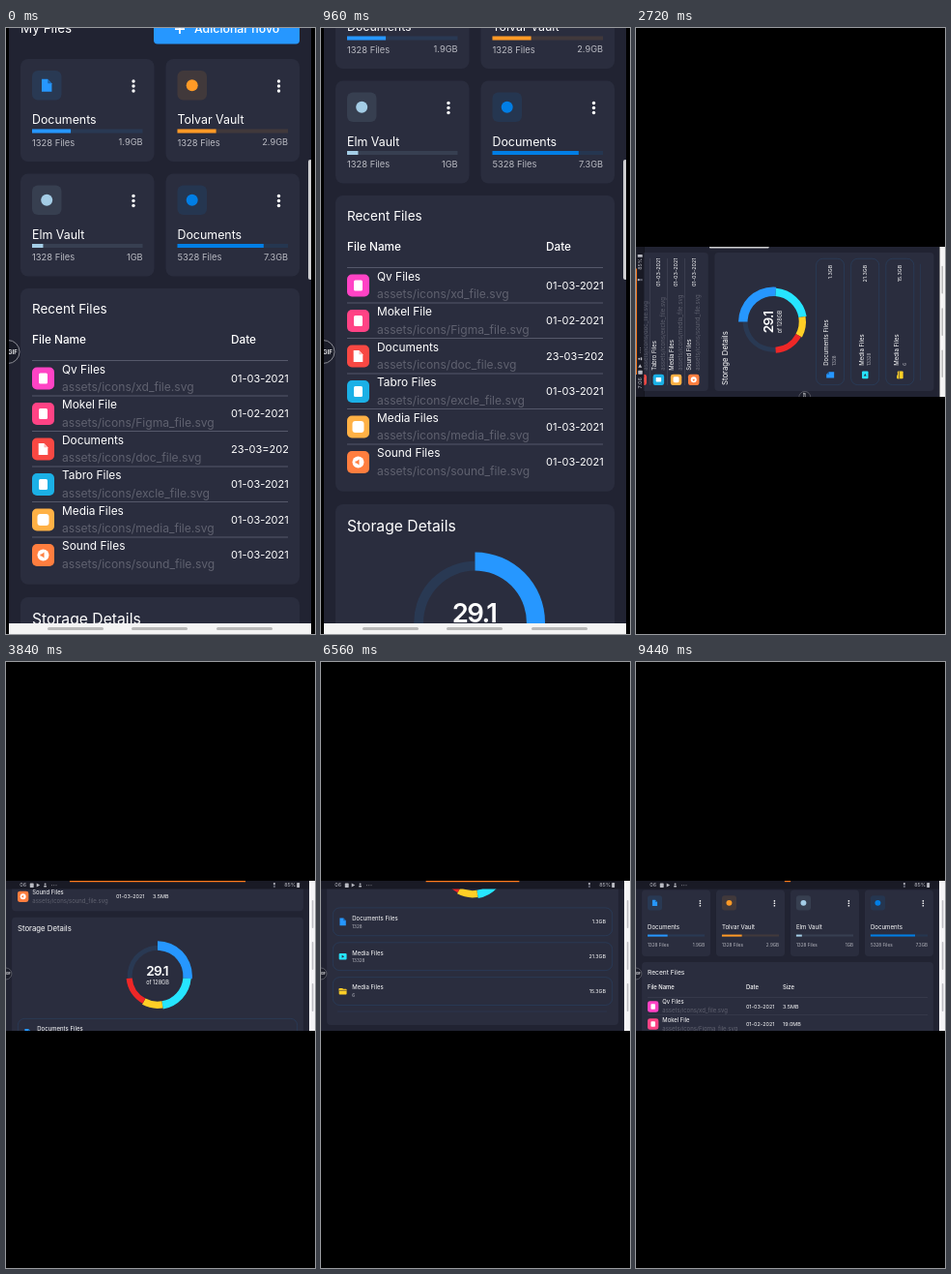
Animation, 320 px wide and 626 px high, one loop 9600 ms. Source, as an HTML page with a canvas:

```html
<!DOCTYPE html>
<html lang="en">
<head>
<meta charset="utf-8">
<title>File dashboard</title>
<style>
  html, body { margin: 0; width: 100%; height: 100%; overflow: hidden; background: #000; }
  canvas { display: block; width: 320px; height: 626px; }
</style>
</head>
<body>
<canvas></canvas>
<script>
const W = 320, H = 626, LOOP = 9600, STEP = 160;
const HALF = 0.495; // size of the turned screen relative to the upright one
const BG = '#212332', CARD = '#2a2d3e', BLUE = '#2697ff', CYAN = '#26e5ff',
      YELLOW = '#ffcf26', RED = '#ee2727', WHITE = '#fff', DIM = '#b9bac2', FAINT = '#5f616f';

const canvas = document.querySelector('canvas');
const ctx = canvas.getContext('2d');
const ratio = window.devicePixelRatio || 1;
canvas.width = W * ratio;
canvas.height = H * ratio;
const snap = canvas.cloneNode();

const drives = [
  ['Documents', 1328, '1.9GB', BLUE, 0.35],
  ['Tolvar Vault', 1328, '2.9GB', '#ff9a26', 0.35],
  ['Elm Vault', 1328, '1GB', '#a4cde6', 0.1],
  ['Documents', 5328, '7.3GB', '#007ee5', 0.78],
];
const files = [
  ['Qv Files', 'xd_file', '01-03-2021', '3.5MB', '#ff43c5'],
  ['Mokel File', 'Figma_file', '01-02-2021', '19.0MB', '#ff4385'],
  ['Documents', 'doc_file', '23-03=2021', '32.5MB', '#f84843'],
  ['Tabro Files', 'excle_file', '01-03-2021', '34.5MB', '#1bb0e6'],
  ['Media Files', 'media_file', '01-03-2021', '2.5GB', '#ffb145'],
  ['Sound Files', 'sound_file', '01-03-2021', '3.5MB', '#ff7e3f'],
];
const groups = [
  ['Documents Files', 1328, '1.3GB', BLUE],
  ['Media Files', 13328, '21.3GB', CYAN],
  ['Media Files', 6, '15.3GB', YELLOW],
];

const uprightScroll = [[0, 0], [960, 96], [1280, 300], [1440, 425], [1600, 441]];
const wideScroll = [[3680, 204], [4300, 204], [5120, 294.5], [5760, 318.5], [8000, 318.5], [9440, 0]];
const glowLevel = [[1280, 0], [1600, 1], [2080, 0]];

function at(keys, t) {
  if (t <= keys[0][0]) return keys[0][1];
  for (let i = 1; i < keys.length; i++) {
    const [t0, a] = keys[i - 1], [t1, b] = keys[i];
    if (t < t1) return a + (b - a) * (t - t0) / (t1 - t0);
  }
  return keys[keys.length - 1][1];
}

function box(x, y, w, h, r, color) {
  ctx.fillStyle = color;
  ctx.beginPath();
  ctx.roundRect(x, y, w, h, r);
  ctx.fill();
}

function dot(x, y, r, color) {
  ctx.fillStyle = color;
  ctx.beginPath();
  ctx.arc(x, y, r, 0, 7);
  ctx.fill();
}

function shape(color, ...points) {
  ctx.fillStyle = color;
  ctx.beginPath();
  points.forEach(p => ctx.lineTo(...p));
  ctx.fill();
}

function text(s, x, y, size, color = WHITE, align = 'left', weight = 400) {
  ctx.font = `${weight} ${size}px Inter, sans-serif`;
  ctx.fillStyle = color;
  ctx.textAlign = align;
  ctx.textBaseline = 'middle';
  ctx.fillText(s, x, y + 0.4);
}

function clipped(x, y, w, h, draw) {
  ctx.save();
  ctx.beginPath();
  ctx.rect(x, y, w, h);
  ctx.clip();
  draw();
  ctx.restore();
}

// Sheet of paper with a folded corner, k = half height
function sheet(x, y, k, color, fold) {
  const w = k * 0.8;
  shape(color, [x - w, y - k], [x + w * 0.2, y - k], [x + w, y - k * 0.3], [x + w, y + k], [x - w, y + k]);
  shape(fold, [x + w * 0.2, y - k], [x + w, y - k * 0.3], [x + w * 0.2, y - k * 0.3]);
}

function driveCard([name, count, size, color, part], i, x, y, w, h) {
  const extra = h - 106, right = x + w - 12;
  box(x, y, w, h, 8, CARD);
  box(x + 12, y + 12, 30.5, 30.5, 6, color + '1c');
  if (i) dot(x + 27.2, y + 27.2, 6, color);
  else sheet(x + 27.2, y + 27.2, 6.5, color, '#1c66ad');
  for (const dy of [-5, 0, 5]) dot(x + w - 21.5, y + 28 + dy, 1.7, WHITE);
  text(name, x + 12, y + 63 + extra * 0.43, 12.4);
  const barY = y + 72.5 + extra * 0.64, barW = w - 24;
  box(x + 12, barY, barW, 4, 0, color + '1c');
  box(x + 12, barY, barW * part, 4, 0, color);
  const countY = y + 86.3 + extra * 0.86;
  text(count + ' Files', x + 12, countY, 9.4, DIM);
  text(size, right, countY, 9.2, DIM, 'right');
}

function fileIcon(i, x, y, color) {
  box(x - 11.5, y - 11.5, 23, 23, 5, color);
  if (i === 2) sheet(x, y, 6, WHITE, '#ffb6b4');
  else if (i === 4) box(x - 6, y - 6, 12, 12, 3, WHITE);
  else if (i === 5) {
    dot(x, y, 6, WHITE);
    shape(color, [x - 3, y - 1], [x - 1.5, y - 1], [x + 1, y - 3], [x + 1, y + 3], [x - 1.5, y + 1], [x - 3, y + 1]);
  } else box(x - 4.5, y - 5.5, 9, 11, 1.5, WHITE);
}

function recentCard(y, w) {
  box(15, y, w, 305.8, 8, CARD);
  text('Recent Files', 27, y + 21.5, 13.5);
  clipped(27, y, w - 24, 305, () => {
    ['File Name', 'Date', 'Size'].forEach((s, i) =>
      text(s, [27, 233, 310][i], y + 53, 11.8, WHITE, 'left', 500));
    files.forEach(([name, path, date, size, color], i) => {
      const top = y + 74.5 + i * 36.5;
      box(27, top - 0.4, w - 24, 0.8, 0, '#55586a');
      fileIcon(i, 38.5, top + 18.5, color);
      text(name, 58, top + 9.5, 11.9);
      text(`assets/icons/${path}.svg`, 58, top + 27.5, 12.1, FAINT);
      text(date, 233, top + 18.5, 11);
      text(size, 310, top + 18.5, 11);
    });
  });
}

function donut(x, y) {
  const parts = [[25, 72.5, BLUE], [20, 70.2, CYAN], [10, 67.9, YELLOW], [15, 65.6, RED], [25, 63.3, BLUE + '1c']];
  let from = -Math.PI / 2;
  for (const [value, outer, color] of parts) {
    const to = from + value / 95 * Math.PI * 2;
    ctx.fillStyle = color;
    ctx.beginPath();
    ctx.arc(x, y, outer, from, to);
    ctx.arc(x, y, 53.4, to, from, true);
    ctx.fill();
    from = to;
  }
  ctx.letterSpacing = '-1.6px';
  text('29.1', x - 1, y - 8.8, 27.5, WHITE, 'center', 600);
  ctx.letterSpacing = '0px';
  text('of 128GB', x, y + 14, 11.2, WHITE, 'center');
}

function groupIcon(i, x, y, color) {
  if (i === 0) sheet(x, y, 8, color, '#1c66ad');
  else if (i === 1) {
    box(x - 8, y - 6.5, 16, 13, 2, color);
    shape(CARD, [x - 2, y - 3], [x + 3, y], [x - 2, y + 3]);
  } else {
    box(x - 8, y - 6.5, 8, 5, 1, color);
    box(x - 8, y - 5, 16, 11.5, 1.5, color);
    box(x - 8, y - 2.6, 16, 1.2, 0, CARD);
  }
}

function storageCard(y, w) {
  box(15, y, w, 456, 8, CARD);
  text('Storage Details', 27, y + 23, 15.7);
  donut(15 + w / 2, y + 122);
  groups.forEach(([name, count, size, color], i) => {
    const top = y + 211.2 + i * 72.5, mid = top + 29.3;
    ctx.strokeStyle = BLUE + '26';
    ctx.lineWidth = 1.6;
    ctx.beginPath();
    ctx.roundRect(27.8, top, w - 25.6, 58.2, 14);
    ctx.stroke();
    groupIcon(i, 48.5, mid, color);
    text(name, 68, mid - 7.5, 12.2);
    text(count, 68, mid + 9.2, 9.2, DIM);
    text(size, w - 11, mid, 10.8, WHITE, 'right');
  });
  box(37, y + 427, w - 46, 1.2, 0, BLUE + '26');
}

function page(wide) {
  const w = wide ? 610 : 289, columns = wide ? 4 : 2, h = wide ? 138.6 : 106;
  const cardW = (w - 12 * (columns - 1)) / columns;
  text('My Files', 15, 1, 13.5);
  box(w - 136, -20, 151, 36.5, 4, BLUE);
  box(w - 114, 0.2, 10, 1.8, 0, WHITE);
  box(w - 109.9, -4, 1.8, 10, 0, WHITE);
  text('Adicionar novo', w - 94, 1, 12.3, WHITE, 'left', 500);
  drives.forEach((drive, i) => driveCard(drive, i,
    15 + (i % columns) * (cardW + 12), 32 + Math.floor(i / columns) * 118.5, cardW, h));
  const top = wide ? 32 + h + 12 : 269;
  recentCard(top, w);
  storageCard(top + 319, w);
}

function bubble() {
  dot(2, 334.5, 12, '#1b1d29');
  ctx.strokeStyle = '#8c8d95';
  ctx.lineWidth = 1;
  ctx.stroke();
  text('GIF', 2, 334.5, 6, WHITE, 'left', 600);
}

// Status bar drawn from (0, 0), with the orange line that shrinks to its middle
function status(w, clock, clockX, t) {
  box(0, 0, w, 17, 0, '#191a25');
  text(clock, clockX, 9, 11, DIM);
  box(50, 5, 8, 9, 1, DIM);
  shape(DIM, [64, 5], [71, 9], [64, 13]);
  dot(82, 7, 2, DIM);
  box(79, 10, 6, 3, 1, DIM);
  for (let i = 0; i < 3; i++) dot(96 + i * 4.5, 9.5, 1, DIM);
  text('85%', w - 28, 9, 11, DIM, 'right');
  box(w - 26, 4, 6, 10, 1, DIM);
  dot(w - 73, 6, 2.2, DIM);
  box(w - 75, 9, 4, 5, 0, FAINT);
  const part = 0.02 + (9440 - t) * 1e-4;
  box(w / 2 * (1 - part), 0, w * part, 2.4, 0, '#ff7a1c');
}

function upright(scroll, glow = 0) {
  clipped(3, 0, 313, 615, () => {
    box(0, 0, W, 615, 0, BG);
    ctx.save();
    ctx.translate(0, -scroll);
    page(false);
    ctx.restore();
    if (glow) dot(159.5, 615 - 33 * glow + 811, 811, `rgba(56,122,118,${0.38 * glow})`);
    bubble();
    box(313, 136, 4, 124, 2, '#cfcfd2');
  });
  box(3, 615, 313, 13, 0, '#f4f4f4');
  for (const x of [43, 130, 218]) box(x, 619, 58, 3, 1.5, '#b9b9b9');
}

function turned(t) {
  clipped(0, 226, W, 155, () => {
    box(0, 226, W, 155, 0, '#000');
    ctx.translate(8.2, 382.4);
    ctx.rotate(-Math.PI / 2);
    ctx.scale(HALF, 0.498);
    upright(441);
    ctx.translate(0, -17);
    status(W, '7:06', 20, t);
  });
}

function landscape(t) {
  clipped(0, 226, W, 155, () => {
    box(0, 226, 314, 155, 0, BG);
    ctx.save();
    ctx.translate(-1.4, 235.4 - 32 * HALF - at(wideScroll, t));
    ctx.scale(HALF, HALF);
    page(true);
    ctx.restore();
    ctx.save();
    ctx.translate(0, 226);
    ctx.scale(HALF, HALF);
    status(314 / HALF, '06', 29, t);
    ctx.restore();
    ctx.save();
    ctx.translate(-1, 322 - 334.5 * HALF);
    ctx.scale(HALF, HALF);
    bubble();
    ctx.restore();
    box(314, 226, 6, 155, 0, '#f4f4f6');
    for (const y of [246, 289, 332]) box(316.8, y, 1.6, 29, 0.8, '#bdbdc2');
  });
}

function blend(t) {
  upright(441);
  const copy = snap.getContext('2d');
  copy.clearRect(0, 0, snap.width, snap.height);
  copy.drawImage(canvas, 0, 0);
  box(0, 0, W, H, 0, '#000');
  turned(t);
  ctx.globalAlpha = 0.5;
  ctx.drawImage(snap, 0, 0, W, H);
  ctx.globalAlpha = 1;
}

function frame() {
  const t = Math.floor(performance.now() % LOOP / STEP) * STEP;
  ctx.setTransform(ratio, 0, 0, ratio, 0, 0);
  box(0, 0, W, H, 0, '#000');
  if (t < 2560) upright(at(uprightScroll, t), at(glowLevel, t));
  else if (t < 2720) blend(t);
  else if (t < 3680) turned(2720);
  else landscape(t);
  requestAnimationFrame(frame);
}
frame();
</script>
</body>
</html>
```
